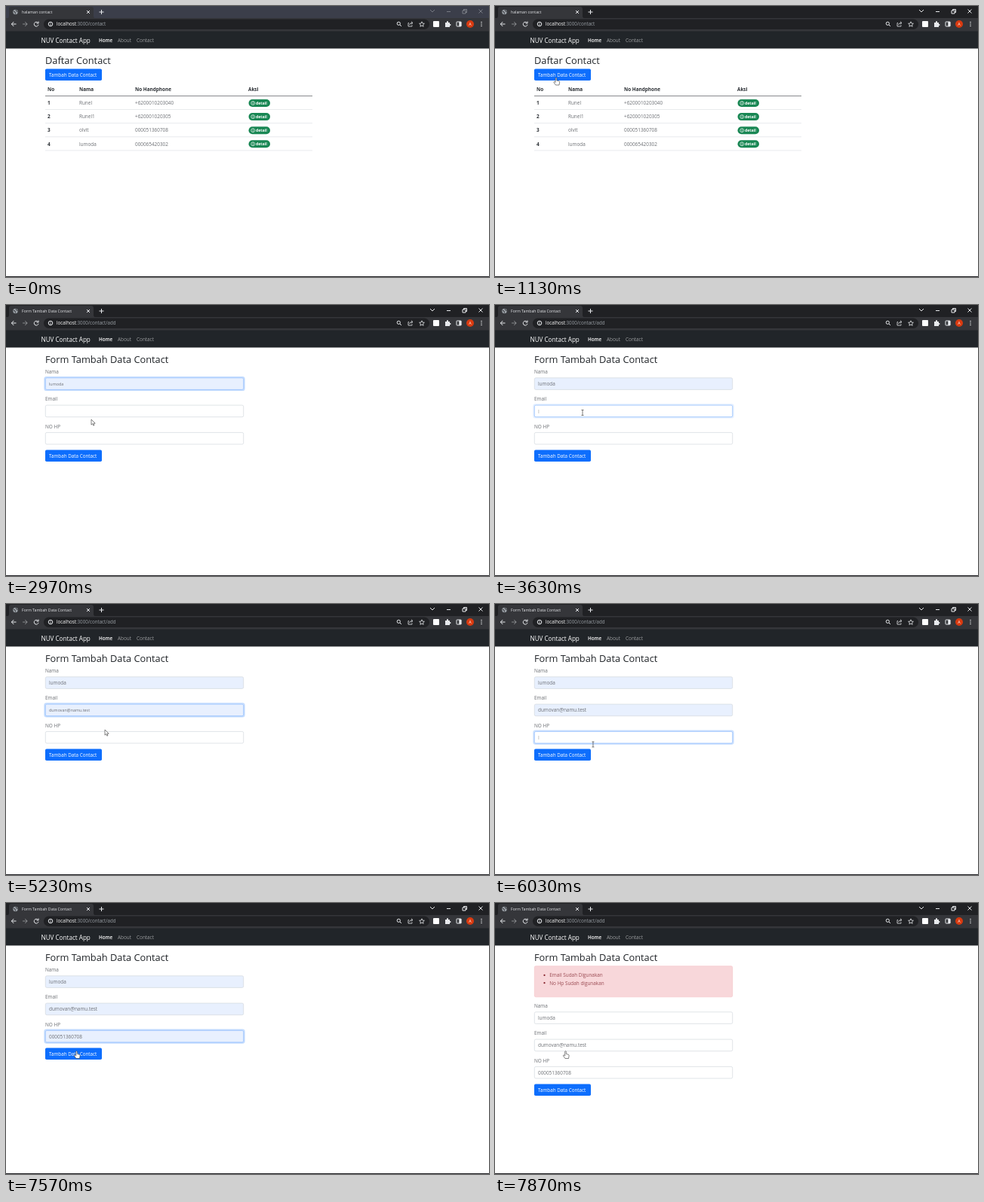
Recreate the animation shown at these times as an HTML page. Size 640 by 360 pixels, loop 8 s.

```html
<!DOCTYPE html>
<html lang="id">
<head>
<meta charset="utf-8">
<title>Contact App</title>
<style>
  html, body { margin: 0; height: 100%; overflow: hidden; background: #fff; }
  svg { display: block; width: 100vw; height: 100vh; }
  text { font-family: "Open Sans", "Noto Sans", sans-serif; white-space: pre; }
  .icon { fill: none; stroke: #e8eaed; stroke-width: 1; }
</style>
</head>
<body>
<svg viewBox="0 0 640 360">
  <g id="chrome"></g>
  <g id="page"></g>
  <g id="cursor"></g>
</svg>
<script>
const LOOP = 8000;
const ACTIVE_AT = 400, FORM_AT = 1300, RESULT_AT = 7700;
const BLINK = 530;
const INK = "#2c3035", MUTED = "#6b6e73";
const FRAME = "#202124", BAR = "#35363a", LIGHT = "#e8eaed";
const PHONE = "000051360708";

// One entry per input: when it gets focus, previews a suggestion, is filled and loses focus
const fields = [
  { label: "Nama", value: "lumoda", focus: 2000, preview: 2700, fill: 3100, blur: 3560 },
  { label: "Email", value: "dumovan@namu.test", focus: 3560, preview: 4150, fill: 5300, blur: 5900 },
  { label: "NO HP", value: PHONE, focus: 5900, preview: 6250, fill: 6600, blur: RESULT_AT },
];
const contacts = [
  ["Runel", "+6200010203040"],
  ["Runel1", "+620001020305"],
  ["olvit", PHONE],
  ["lumoda", "000065420302"],
];

// time, x, y, pointer shape from that time on
const path = [
  [0, 250, 366, "arrow"], [30, 250, 366, "arrow"], [780, 83, 96, "hand"],
  [1000, 81, 95, "hand"], [FORM_AT, 81, 95, "arrow"], [1700, 81, 97, "beam"],
  [2000, 82, 104, "beam"], [2530, 82, 104, "beam"], [2620, 88, 115, "arrow"],
  [2850, 113, 152, "arrow"], [3150, 113, 152, "arrow"], [3450, 116, 143, "beam"],
  [3700, 116, 143, "beam"], [3850, 117, 150, "arrow"], [4250, 121, 164, "arrow"],
  [4430, 121, 164, "arrow"], [4820, 134, 178, "arrow"], [5200, 131, 167, "arrow"],
  [5320, 131, 167, "arrow"], [5650, 129, 178, "beam"], [5920, 129, 178, "beam"],
  [6050, 130, 187, "arrow"], [6450, 134, 218, "arrow"], [6950, 134, 220, "arrow"],
  [7050, 134, 220, "arrow"], [7350, 93.5, 196.5, "hand"],
];
const pointers = {
  arrow: `<path d="M0 0V7.2L1.7 5.7 2.8 8.2 4 7.7 2.9 5.2H5.2Z" fill="#fff" stroke="#333" stroke-width=".6"/>`,
  beam: `<path d="M-1.5-3.5H1.5M0-3.5V3.5M-1.5 3.5H1.5" fill="none" stroke="#444" stroke-width=".7"/>`,
  hand: `<path d="M-.8 4.5V.7Q0-.5.8.7V4L3.8 4.8Q4.8 5.2 4.6 6.4L4 10H-.6L-3 6.6Q-3.2 5-1.8 5.6L-.8 6.5Z" fill="#fff" stroke="#333" stroke-width=".6"/>`,
};

const $ = id => document.getElementById(id);
const text = (x, y, s, size = 6.4, fill = INK, weight = 400, extra = "") =>
  `<text x="${x}" y="${y}" font-size="${size}" fill="${fill}" font-weight="${weight}" ${extra}>${s}</text>`;
const rect = (x, y, w, h, fill, rx = 0, extra = "") =>
  `<rect x="${x}" y="${y}" width="${w}" height="${h}" rx="${rx}" fill="${fill}" ${extra}/>`;
const line = (x, y, w, color) => rect(x, y, w, .7, color);
const icon = (d, extra = "") => `<path class="icon" d="${d}" ${extra}/>`;
const dot = (x, y, r, fill) => `<circle cx="${x}" cy="${y}" r="${r}" fill="${fill}"/>`;
const ring = (x, y, r) => `<circle class="icon" cx="${x}" cy="${y}" r="${r}"/>`;
const button = y => rect(52, y, 75, 15.5, "#0d6efd", 1.8) + text(57, y + 10, "Tambah Data Contact", 6.3, "#fff", 500);
const heading = s => text(52, 77, s, 12.8, "#212529", 500);

function browser(active) {
  return rect(0, 0, 640, 17, active ? FRAME : "#3b3e4a")
    + `<path d="M1 17Q4 16 4 13V4Q4 1 7 1H113Q116 1 116 4V13Q116 16 119 17Z" fill="${BAR}"/>`
    + rect(0, 16, 640, 18, BAR) + rect(50, 17.5, 511, 13.5, FRAME, 6.7)
    + rect(0, 33.5, 640, 23, "#212529")
    + dot(12.5, 8, 3.2, "#9aa0a6") + icon("M10 7L12 8 12.5 10.5M13 5L14 7 15.5 7.5", `style="stroke:${BAR}"`)
    + icon("M107 6L111 10M111 6L107 10M123.5 8H129.5M126.5 5V11")
    + icon("M562 5L565 8 568 5M584 7.5H589M605 6H609V10H605ZM606.5 6V4.5H610.5V8.5H609M626.5 4.5L631.5 9.5M631.5 4.5L626.5 9.5",
      `opacity="${active ? 1 : .35}"`)
    + icon("M13.5 24H7.5M10.3 21L7.3 24 10.3 27")
    + icon("M22 24H28M25.2 21L28.2 24 25.2 27", 'opacity=".45"')
    + icon("M42.3 22.2A2.9 2.9 0 1 0 43 24.8M43 20.5V23H40.5")
    + ring(59, 24, 2.8) + icon("M59 23.4V25.8M59 22V22.7", 'style="stroke-width:.8"')
    + ring(520.3, 23.3, 2.1) + icon("M522 25L524 27")
    + icon("M534 22.5H533V27H538V25.5M534.5 25Q535 22.5 538.5 22.5M537 20.7L539 22.5 537 24.3", 'style="stroke-width:.8"')
    + icon("M551 20.8L552 23.1 554.4 23.3 552.6 24.9 553.1 27.3 551 26 548.9 27.3 549.4 24.9 547.6 23.3 550 23.1Z", 'style="stroke-width:.8"')
    + rect(566, 20, 8, 8, "#fff", 1)
    + `<path d="M582 22H584Q583.5 20 585 20T586 22H588V24Q589.5 23.5 589.5 25T588 26V28H582Z" fill="${LIGHT}"/>`
    + rect(597, 21, 6, 6, "none", .6, 'class="icon"') + rect(600.3, 21, 3, 6, LIGHT)
    + dot(615, 24, 5, "#d93a10") + text(615, 26, "A", 5.4, "#fff", 400, 'text-anchor="middle"')
    + [21.5, 24, 26.5].map(y => dot(630, y, .75, LIGHT)).join("")
    + text(46.5, 48.5, "NUV Contact App", 8.15, "#fff", 500)
    + text(123, 47.5, "Home", 6.3, "#fff", 600)
    + text(148, 47.5, "About", 6.4, "#9b9d9f") + text(173, 47.5, "Contact", 6.4, "#9b9d9f")
    + rect(0, 359, 640, 1, FRAME);
}

function tabAndAddress(title, tail) {
  return text(21, 10, title, 5.2, LIGHT)
    + text(67, 26.3, `localhost<tspan fill="#9aa0a6" font-weight="400">:3000/${tail}</tspan>`, 6.2, "#fff", 500);
}

function listPage() {
  const rows = contacts.map(([name, phone], i) => {
    const y = 129 + 18.1 * i;
    return text(55, y + 2.2, i + 1, 6.4, INK, 700)
      + text(97, y + 2.2, name, 6.4, MUTED) + text(171, y + 2.2, phone, 6.4, MUTED)
      + rect(321.5, y - 5, 28.5, 10, "#198754", 5)
      + `<circle cx="327.2" cy="${y}" r="2.4" fill="none" stroke="#fff" stroke-width=".7"/>`
      + rect(326.9, y - .5, .7, 1.8, "#fff") + rect(326.9, y - 1.5, .7, .7, "#fff")
      + text(331, y + 1.9, "detail", 5.2, "#fff", 700)
      + line(52, y + 8.3, 354, "#dee2e6");
  });
  const heads = [[55, "No"], [97, "Nama"], [171, "No Handphone"], [321, "Aksi"]];
  return tabAndAddress("halaman contact", "contact") + heading("Daftar Contact") + button(83.5)
    + heads.map(([x, s]) => text(x, 113.3, s, 6.4, INK, 700)).join("")
    + line(52, 119, 354, "#55585c") + rows.join("");
}

function field(f, i, t, shift) {
  const y = 96.5 + 36.3 * i + shift, sent = t >= RESULT_AT;
  const focused = t >= f.focus && t < f.blur;
  const filled = t >= f.fill, shown = t >= f.preview;
  const size = filled ? 6.4 : 5.4;
  const since = t - (filled ? f.fill : f.focus);
  const caretOn = focused && (filled || !shown) && since % (2 * BLINK) < BLINK;
  const caret = caretOn ? `<tspan fill="#222" font-weight="300" dx="-.5">|</tspan>` : "";
  const glow = focused ? Math.min(1, (t - f.focus) / 150) : 0;
  return text(52, y - 5.4, f.label, 6.4, MUTED)
    + (glow ? rect(51.2, y - .8, 264.6, 17.6, "none", 2.4, `stroke="#c2dbfe" stroke-width="1.6" opacity="${glow}"`) : "")
    + rect(52.3, y + .3, 262.4, 15.6, shown && !sent ? "#e8f0fe" : "#fff", 1.8,
      `stroke="${focused ? "#86b7fe" : "#d3d8df"}" stroke-width=".7"`)
    + text(57, y + (filled ? 10.5 : 10.2), (shown ? f.value : "") + caret, size, MUTED);
}

function formPage(t) {
  const sent = t >= RESULT_AT, shift = sent ? 48 : 0;
  const errors = ["Email Sudah Digunakan", "No Hp Sudah digunakan"];
  const alert = rect(52.3, 83.8, 262.4, 41, "#f8d7da", 1.8, 'stroke="#f5c2c7" stroke-width=".6"')
    + errors.map((s, i) => dot(65.5, 95.9 + 10.3 * i, 1.1, "#842029")
      + text(72.3, 98.2 + 10.3 * i, s, 6.4, "#9a4a52")).join("");
  return tabAndAddress("Form Tambah Data Contact", "contact/add") + heading("Form Tambah Data Contact")
    + (sent ? alert : "")
    + fields.map((f, i) => field(f, i, t, shift)).join("") + button(192.6 + shift);
}

function moveCursor(t) {
  const next = path.findIndex(p => p[0] > t);
  const a = path[next < 0 ? path.length - 1 : next - 1], b = next < 0 ? a : path[next];
  const k = b === a ? 0 : (t - a[0]) / (b[0] - a[0]);
  const e = k * k * (3 - 2 * k);
  const at = n => a[n] + (b[n] - a[n]) * e;
  $("cursor").setAttribute("transform", `translate(${at(1)} ${at(2)})`);
  setHTML("cursor", pointers[a[3]]);
}

const drawn = {};
function setHTML(id, html) {
  if (drawn[id] !== html) $(id).innerHTML = drawn[id] = html;
}

function draw(now) {
  const t = now % LOOP;
  setHTML("chrome", browser(t >= ACTIVE_AT));
  setHTML("page", t < FORM_AT ? listPage() : formPage(t));
  moveCursor(t);
}

const start = performance.now();
function frame() {
  draw(performance.now() - start);
  requestAnimationFrame(frame);
}
frame();
</script>
</body>
</html>
```
